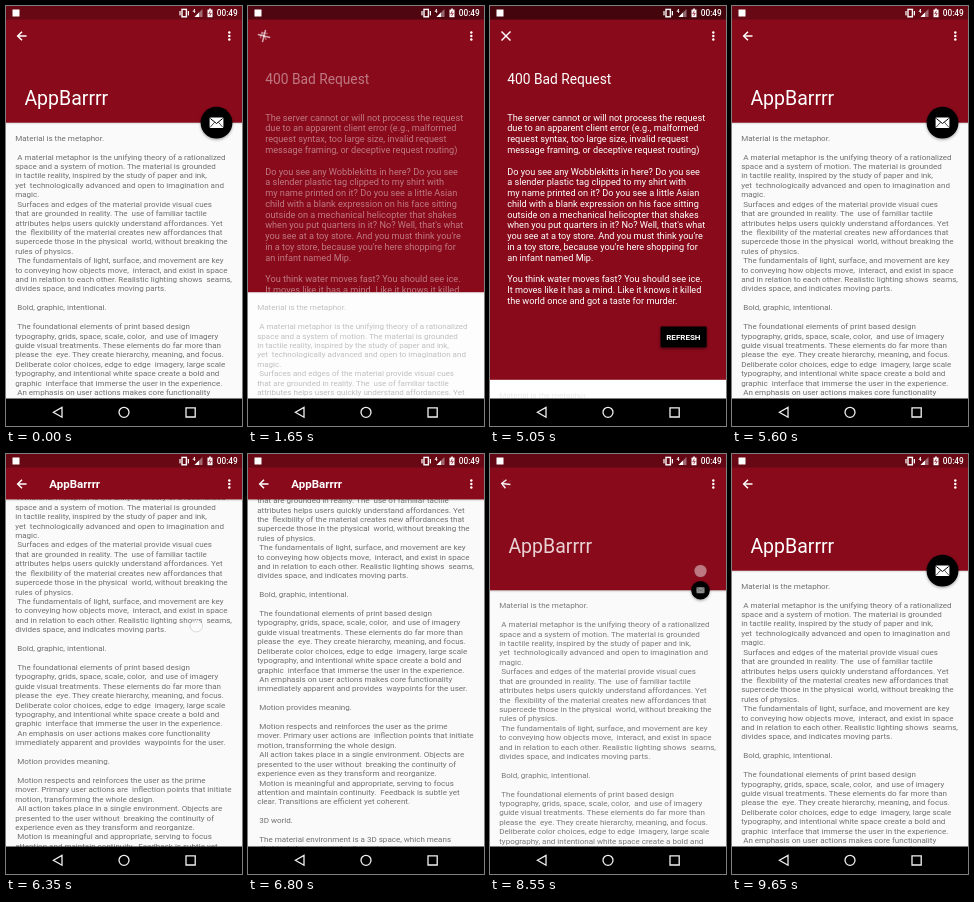
Recreate the animation shown at these times as an HTML page with a canvas. Size 236x420 px, loop 9700 ms.

```html
<!DOCTYPE html>
<html lang="en">
<head>
<meta charset="utf-8">
<title>Collapsing app bar</title>
<style>
  html, body { margin: 0; width: 100%; height: 100%; overflow: hidden; background: #000; }
  canvas { display: block; width: 236px; height: 420px; }
</style>
</head>
<body>
<canvas id="stage"></canvas>
<script>
const W = 236, H = 420, LOOP = 9700;
const BAR = 45.4, HEAD = 116.7, PANEL = 373.8, NAV = 392.5;
const RED = '#890a1b';
const FONT = 'Roboto, "Noto Sans", sans-serif';

const article = `Material is the metaphor.

 A material metaphor is the unifying theory of a rationalized
space and a system of motion. The material is grounded
in tactile reality, inspired by the study of paper and ink,
yet  technologically advanced and open to imagination and
magic.
 Surfaces and edges of the material provide visual cues
that are grounded in reality. The  use of familiar tactile
attributes helps users quickly understand affordances. Yet
the  flexibility of the material creates new affordances that
supercede those in the physical  world, without breaking the
rules of physics.
 The fundamentals of light, surface, and movement are key
to conveying how objects move,  interact, and exist in space
and in relation to each other. Realistic lighting shows  seams,
divides space, and indicates moving parts.

 Bold, graphic, intentional.

 The foundational elements of print based design
typography, grids, space, scale, color,  and use of imagery
guide visual treatments. These elements do far more than
please the  eye. They create hierarchy, meaning, and focus.
Deliberate color choices, edge to edge  imagery, large scale
typography, and intentional white space create a bold and
graphic  interface that immerse the user in the experience.
 An emphasis on user actions makes core functionality
immediately apparent and provides  waypoints for the user.

 Motion provides meaning.

 Motion respects and reinforces the user as the prime
mover. Primary user actions are  inflection points that initiate
motion, transforming the whole design.
 All action takes place in a single environment. Objects are
presented to the user without  breaking the continuity of
experience even as they transform and reorganize.
 Motion is meaningful and appropriate, serving to focus
attention and maintain continuity.  Feedback is subtle yet
clear. Transitions are efficient yet coherent.

 3D world.

 The material environment is a 3D space, which means
all objects have x, y, and z dimensions.`.split('\n');

const message = `The server cannot or will not process the request
due to an apparent client error (e.g., malformed
request syntax, too large size, invalid request
message framing, or deceptive request routing)

Do you see any Wobblekitts in here? Do you see
a slender plastic tag clipped to my shirt with
my name printed on it? Do you see a little Asian
child with a blank expression on his face sitting
outside on a mechanical helicopter that shakes
when you put quarters in it? No? Well, that's what
you see at a toy store. And you must think you're
in a toy store, because you're here shopping for
an infant named Mip.

You think water moves fast? You should see ice.
It moves like it has a mind. Like it knows it killed
the world once and got a taste for murder.`.split('\n');

const canvas = document.getElementById('stage');
const g = canvas.getContext('2d');
const dpr = window.devicePixelRatio || 1;
canvas.width = W * dpr;
canvas.height = H * dpr;

const clamp = v => Math.max(0, Math.min(1, v));
const part = (t, a, b) => clamp((t - a) / (b - a));
const mix = (a, b, p) => a + (b - a) * p;
const smooth = p => p * p * (3 - 2 * p);
const decelerate = p => 1 - (1 - p) ** 2;

// Piecewise value through [time, value] points.
function track(t, pts, ease = p => p) {
  if (t <= pts[0][0]) return pts[0][1];
  for (let i = 1; i < pts.length; i++) {
    const [a, u] = pts[i - 1], [b, v] = pts[i];
    if (t <= b) return mix(u, v, ease((t - a) / (b - a)));
  }
  return pts[pts.length - 1][1];
}

function text(str, x, y, size, color, weight = 400) {
  g.font = `${weight} ${size}px ${FONT}`;
  g.fillStyle = color;
  g.fillText(str, x, y);
}

function lines(list, x, y, size, step, color) {
  list.forEach((str, i) => {
    const ly = y + i * step;
    if (str && ly > 0 && ly < H) text(str, x, ly, size, color);
  });
}

function rect(x, y, w, h, color) {
  g.fillStyle = color;
  g.fillRect(x, y, w, h);
}

function roundRect(x, y, w, h, color) {
  g.fillStyle = color;
  g.beginPath();
  g.roundRect(x, y, w, h, 1.2);
  g.fill();
}

function disc(x, y, r, color) {
  g.fillStyle = color;
  g.beginPath();
  g.arc(x, y, r, 0, 7);
  g.fill();
}

function path(pts, { fill, stroke, width = 1, close = false }) {
  g.beginPath();
  pts.forEach(([x, y], i) => i ? g.lineTo(x, y) : g.moveTo(x, y));
  if (close) g.closePath();
  if (fill) { g.fillStyle = fill; g.fill(); }
  if (stroke) { g.strokeStyle = stroke; g.lineWidth = width; g.stroke(); }
}

function shadow(blur, dy, alpha) {
  g.shadowColor = `rgba(0,0,0,${alpha})`;
  g.shadowBlur = blur * dpr;
  g.shadowOffsetY = dy * dpr;
}

function layer(alpha, draw) {
  if (alpha <= 0) return;
  g.save();
  g.globalAlpha *= alpha;
  draw();
  g.restore();
}

const opened = t =>
  track(t, [[1420, 0], [1800, 1], [5150, 1], [5580, 0], [8480, 0], [8900, 1], [9320, 1], [9640, 0]], smooth);

const scrolled = t => track(t, [
  [5950, 0], [6050, 14], [6200, 62], [6350, 107], [6450, 130], [6550, 146], [6650, 155],
  [6750, 160], [6850, 162], [6980, 162], [7080, 140], [7200, 88], [7320, 38], [7400, 14],
  [7450, 5.4], [7550, 2], [7900, 0]
]);

const fabSize = t => smooth(track(t, [
  [1420, 1], [1580, 0], [5420, 0], [5580, 1], [6150, 1], [6320, 0],
  [7300, 0], [7490, 1], [8480, 1], [8640, 0], [9470, 0], [9630, 1]
]));

function statusBar(p) {
  rect(0, 0, W, 13.6, `rgba(0,0,0,${mix(.25, .5, p)})`);
  rect(6.5, 3.5, 7, 7, '#fff');
  // vibrate
  g.strokeStyle = '#fff';
  g.lineWidth = 1.4;
  g.strokeRect(176, 3.4, 4.4, 7.4);
  rect(173.4, 5, 1.2, 4.4, '#fff');
  rect(181.8, 5, 1.2, 4.4, '#fff');
  // signal
  path([[188.5, 11], [196.5, 11], [196.5, 3]], { fill: 'rgba(255,255,255,.4)', close: true });
  path([[188.5, 11], [193, 11], [193, 6.5]], { fill: '#fff', close: true });
  text('4', 186.5, 7.2, 5.4, '#fff', 700);
  // battery
  rect(201.5, 3.6, 5, 7.6, '#fff');
  rect(203, 2.6, 2, 1.2, '#fff');
  path([[204.5, 4.8], [202.7, 7.8], [205.3, 7.2], [203.6, 10]], { stroke: RED, width: .7 });
  text('00:49', 210.7, 10.3, 8.3, '#fff', 500);
}

function navBar() {
  rect(0, NAV, W, H - NAV, '#000');
  const line = { stroke: '#f2f2f2', width: 1.3, close: true };
  path([[47.4, 406.3], [56, 401.4], [56, 411.2]], line);
  path([[180, 401.8], [189.2, 401.8], [189.2, 411], [180, 411]], line);
  g.beginPath();
  g.arc(118, 406.3, 5, 0, 7);
  g.stroke();
}

function toolbar(p) {
  const line = { stroke: '#fff', width: 1.5 };
  const turned = (angle, draw) => {
    g.translate(16, 30);
    g.rotate(angle);
    draw();
  };
  layer(1 - p, () => turned(p * Math.PI / 2, () => {
    path([[-4.2, 0], [4.5, 0]], line);
    path([[0, -4.3], [-4.3, 0], [0, 4.3]], line);
  }));
  layer(p, () => turned((p - 1) * Math.PI / 2, () => {
    path([[-4.5, -4.5], [4.5, 4.5]], line);
    path([[4.5, -4.5], [-4.5, 4.5]], line);
  }));
  for (const y of [26.4, 30, 33.6]) disc(223.3, y, 1.25, '#fff');
}

function errorPanel(pressed) {
  text('400 Bad Request', 17.3, 77.8, 13.78, '#fff');
  lines(message, 17.2, 114.7, 9.16, 10.76, '#fff');
  g.save();
  shadow(3, 1.2, .55);
  roundRect(170.6, 320.6, 46, 20.6, '#000');
  g.restore();
  if (pressed) roundRect(170.6, 320.6, 46, 20.6, `rgba(255,255,255,${.2 * pressed})`);
  g.textAlign = 'center';
  text('REFRESH', 193.4, 333.8, 8.04, '#fff', 700);
  g.textAlign = 'left';
}

function fab(y, k) {
  if (k < .01) return;
  g.save();
  g.translate(210.5, y);
  g.scale(k, k);
  g.save();
  shadow(3, 1.2, .35);
  disc(0, 0, 15.9, '#000');
  g.restore();
  g.globalAlpha = k;
  roundRect(-6.9, -5.2, 13.8, 10.4, '#fff');
  path([[-6.2, -4.2], [0, .8], [6.2, -4.2]], { stroke: '#000', width: 1 });
  path([[-6.2, 4.4], [-2, -.4]], { stroke: '#000', width: .7 });
  path([[6.2, 4.4], [2, -.4]], { stroke: '#000', width: .7 });
  g.restore();
}

function touch(x, y, alpha) {
  layer(alpha, () => {
    disc(x, y, 6.2, 'rgba(255,255,255,.65)');
    g.strokeStyle = 'rgba(0,0,0,.16)';
    g.lineWidth = .9;
    g.stroke();
  });
}

const visible = (t, a, b) => Math.min(part(t, a, a + 60), 1 - part(t, b - 100, b));

function touches(t) {
  const taps = [[1390, 210.5, 117], [3700, 193.7, 331], [5050, 16, 30], [8400, 210.5, 117], [9290, 16, 30]];
  for (const [at, x, y] of taps) touch(x, y, visible(t, at, at + 220));

  const fy = track(t, [[2500, 251], [2960, 170], [3020, 170], [3380, 251]], smooth);
  touch(mix(190, 192.5, part(t, 3000, 3380)), fy, visible(t, 2440, 3520));

  touch(190.3, 279 - Math.min(scrolled(t), 146), visible(t, 5890, 6560));
  const back = track(t, [[7450, 0], [7700, 12]], smooth);
  touch(mix(190, 195, part(t, 6980, 7450)), 279 - scrolled(t) + back, visible(t, 6940, 7850));
}

function title(f) {
  const size = mix(19.5, 11.5, decelerate(f));
  text('AppBarrrr', mix(18.4, 43.3, f), mix(99, 34.2, f), size, '#fff', f > .99 ? 700 : 400);
}

function render(t) {
  const p = opened(t), s = scrolled(t);
  const f = clamp(s / (HEAD - BAR));
  const top = mix(HEAD, PANEL, p);
  const edge = Math.max(BAR, top - s);

  g.setTransform(dpr, 0, 0, dpr, 0, 0);
  rect(0, 0, W, H, '#fafafa');
  layer(p, () => rect(0, 0, W, H, '#fff'));
  layer(1 - .86 * p, () => lines(article, 9.2, top - s + 18.1, 8.04, 9.415, '#707070'));

  g.save();
  shadow(2, .6, .25 * (1 - p));
  rect(-5, -5, W + 10, edge + 5, RED);
  g.restore();

  g.save();
  g.beginPath();
  g.rect(0, 0, W, edge);
  g.clip();
  layer(clamp(p * 1.6 - .6), () => errorPanel(visible(t, 3700, 3950)));
  layer(clamp(1 - p * 2.5), () => title(f));
  g.restore();

  toolbar(p);
  statusBar(p);
  fab(edge, fabSize(t));
  touches(t);
  navBar();
}

const start = performance.now();
function tick() {
  render((performance.now() - start) % LOOP);
  requestAnimationFrame(tick);
}
tick();
</script>
</body>
</html>
```
